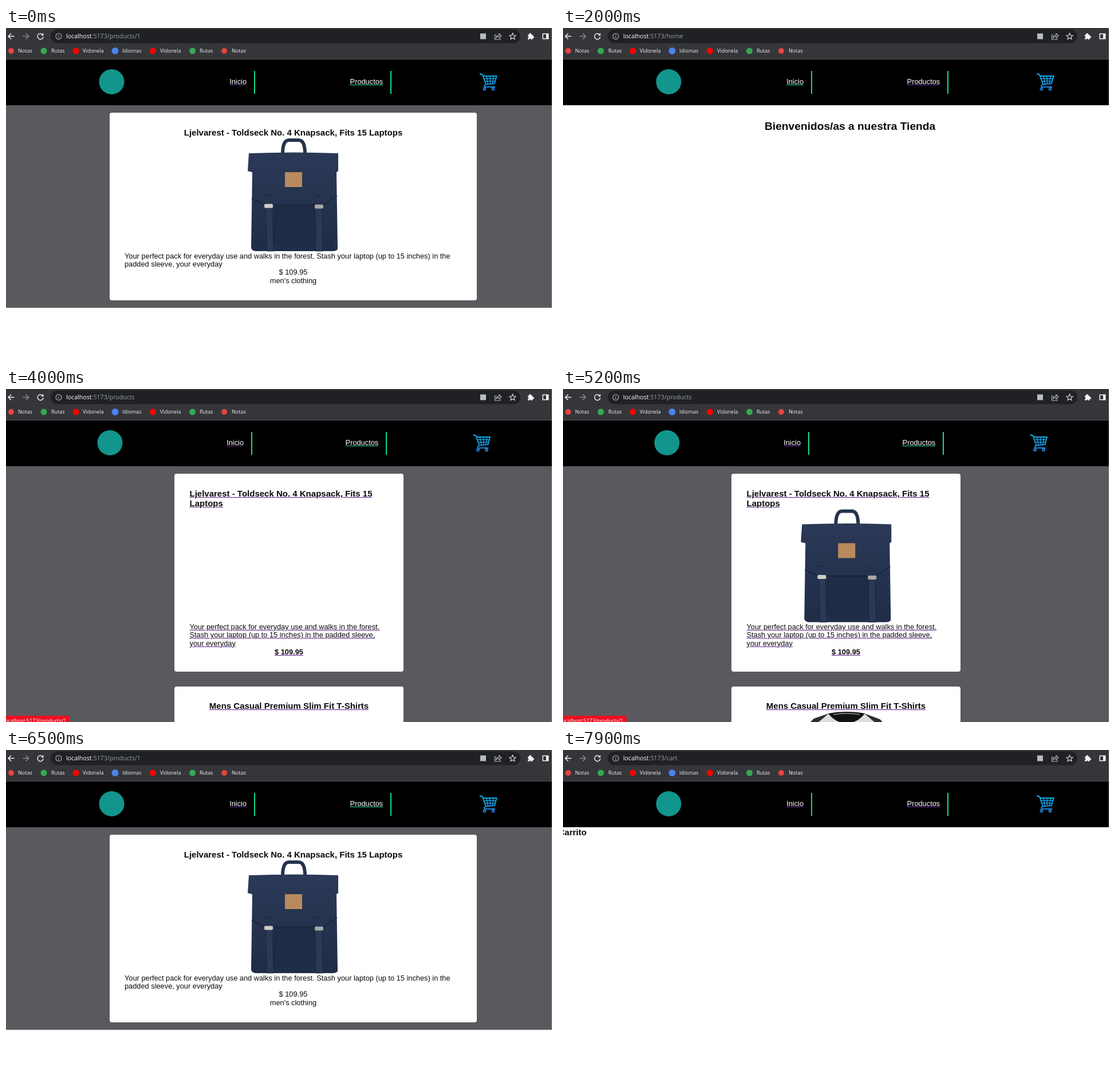
An HTML page that plays this animation: 962 by 582 pixels, repeating every 8 s.

```html
<!DOCTYPE html>
<html lang="es">
<head>
<meta charset="utf-8">
<title>Tienda</title>
<style>
  html, body { margin: 0; width: 100%; height: 100%; overflow: hidden; background: #fff; }
  #stage { position: absolute; left: 0; top: 0; width: 962px; height: 582px; overflow: hidden; background: #fff;
    font: 12.8px/14.4px "Liberation Sans", Arial, sans-serif; color: #0b0b0b; }
  #stage div, #stage p, svg { position: absolute; margin: 0; white-space: nowrap; }
  svg { left: 0; top: 0; overflow: hidden; }

  .ui { font-family: "Open Sans", "Noto Sans", sans-serif; }
  #url { left: 105px; top: 2px; font-size: 10.65px; line-height: 24px; color: #9aa0a6; }
  #url b { font-weight: 400; color: #fff; }
  .mark { top: 32px; font-size: 9px; line-height: 16px; color: #f1f2f3; }

  .nav { top: 87px; color: #fff; text-decoration: underline #6a2ca8; }
  .nav.active { text-decoration-color: #0fe596; }
  .nav.hover { text-decoration-color: #f01020; }
  .bar { top: 75px; width: 2px; height: 40px; background: #12dd8b; }
  .list .logo { transform: translateX(-3px); }
  .list .near { transform: translateX(-5px); }
  .list .mid { transform: translateX(-8px); }
  .list .far { transform: translateX(-11.5px); }

  .page { display: none; left: 0; top: 0; width: 962px; height: 582px; }
  .home .page.home, .loading .page.loading, .list .page.list,
  .detail .page.detail, .cart .page.cart { display: block; }
  .grey { left: 0; top: 135px; width: 953px; background: #5b595e; }
  .card { background: #fff; border-radius: 4px; }
  h1, h2 { position: absolute; margin: 0; white-space: nowrap; }
  h1 { font-size: 19.2px; line-height: 22px; }
  h2 { font-size: 15px; line-height: 17.3px; }
  .center { left: 0; right: 0; text-align: center; }
  .link { text-decoration: underline #551a8b; }
  .bare .photo { display: none; }

  #status { left: 0; top: 571px; height: 17px; box-sizing: border-box; text-indent: -4.3px; padding-right: 6px;
    font-size: 9px; line-height: 17px; color: #fff; background: #eb1020; border-top-right-radius: 3px; }
</style>
</head>
<body>
<div id="stage">
  <svg width="962" height="582" fill="none">
    <defs>
      <linearGradient id="cloth" x1="0" y1="0" x2="0" y2="1">
        <stop stop-color="#2b3957"/><stop offset="1" stop-color="#202d47"/>
      </linearGradient>
      <linearGradient id="blue" gradientUnits="userSpaceOnUse" x1="0" y1="79" x2="0" y2="109">
        <stop stop-color="#08b4e6"/><stop offset="1" stop-color="#2478d4"/>
      </linearGradient>
      <g id="backpack">
        <path d="M483 220 Q483 196 494 196 H511 Q522 196 522 220" fill="none" stroke="#25324c" stroke-width="6"/>
        <path d="M424 219 Q502 216 580 219 L580 250 L577 252 L579 386 Q578 390 570 390 H438 Q429 390 428 384 L430 252 L422 250 Z" fill="url(#cloth)"/>
        <path d="M429 298 L452 309 H554 L578 293" fill="none" stroke="#18233a" stroke-width="1.5"/>
        <path d="M470 310 H538 L540 366 Q540 378 528 378 H480 Q467 378 467 366 Z" fill="#1f2c46" stroke="#19243b"/>
        <path d="M429 370 L454 378 M578 368 L552 378" stroke="#18233a"/>
        <path d="M453 313 H465 L467 390 H456 Z M540 313 H552 L553 390 H541 Z" fill="#2c3956" stroke="#19243b" stroke-width=".8"/>
        <rect x="451" y="307.500" width="15" height="7" rx="2" fill="#d0ceca"/>
        <rect x="539" y="308.500" width="15" height="7" rx="2" fill="#aaa9a8"/>
        <path d="M454 292 H463 M541 293 H550" stroke="#151f33"/>
        <rect x="487" y="252" width="30" height="26" fill="#b98a5c"/>
      </g>
    </defs>

    <rect width="953" height="55" fill="#35363a"/>
    <rect x="78" y="2.500" width="820" height="24" rx="12" fill="#202124"/>
    <path d="M0 54.500 H953" stroke="#505155"/>
    <rect y="55" width="953" height="80" fill="#000"/>

    <g stroke="#f1f2f3" stroke-width="1.5">
      <path d="M14.500 14.500 H4 M9 9.500 L4 14.500 L9 19.500"/>
      <path d="M29 14.500 H39.500 M34.500 9.500 L39.500 14.500 L34.500 19.500" stroke="#87898d"/>
      <path d="M64.200 11.800 A5 5 0 1 0 65 15.500"/>
      <path d="M65.500 8.800 V13.200 H61 Z" fill="#f1f2f3" stroke="none"/>
    </g>
    <g stroke="#b9bcc0" stroke-width="1.100">
      <circle cx="92" cy="14.500" r="5"/>
      <path d="M92 13.700 V17.300 M92 11.500 V12.600"/>
      <rect x="828" y="9.500" width="10" height="10" fill="#b9bcc0" stroke="none"/>
      <path d="M856 12 H853.500 V20 H863 V17.500 M855.500 17 Q856 12.500 861 12.500 V9.800 L865 13.500 L861 17 V14.800 Q858 14.500 855.500 17 Z"/>
      <path d="M884.500 9 L886.100 12.800 L890 13.100 L887 15.700 L888 19.600 L884.500 17.500 L881 19.600 L882 15.700 L879 13.100 L882.900 12.800 Z" stroke="#e4e5e7"/>
    </g>
    <g fill="#f4f4f5">
      <rect x="911" y="11.500" width="8.500" height="8.500" rx="1"/>
      <circle cx="915.200" cy="11" r="2"/><circle cx="920" cy="15.700" r="2"/>
      <circle cx="911" cy="15.800" r="1.500" fill="#35363a"/><circle cx="915.200" cy="20" r="1.500" fill="#35363a"/>
      <path d="M936.500 9.500 H947.500 V19.500 H936.500 Z M938 11 V18 H943 V11 Z" fill-rule="evenodd"/>
    </g>
    <g>
      <circle cx="9" cy="40" r="5" fill="#e8453a"/>
      <circle cx="66" cy="40" r="5.500" fill="#36a853"/>
      <circle cx="122" cy="40" r="5.500" fill="#f00"/>
      <circle cx="190.500" cy="40" r="6" fill="#4a83ec"/>
      <circle cx="256.500" cy="40" r="5.500" fill="#f00"/>
      <circle cx="325.500" cy="40" r="5.500" fill="#36a853"/>
      <circle cx="381" cy="40" r="5" fill="#e8453a"/>
    </g>

    <circle class="logo" cx="184.500" cy="94" r="22" fill="#12958c"/>
    <g class="far" stroke="url(#blue)" stroke-width="2">
      <path d="M827 80 L832 81.500 L838 99 Q833 101 836 103 H854"/>
      <path d="M833 84 H856.500 L853 97 L837.500 98.500"/>
      <path d="M834.500 88.500 H855 M836 93 H854 M839 84 L841.500 98 M845 84 L845.500 98 M851 84 L849.500 97" stroke-width="1.500"/>
      <circle cx="835.500" cy="106.500" r="2"/><circle cx="850.500" cy="106.500" r="2"/>
    </g>
  </svg>

  <div id="url" class="ui"><b>localhost</b>:5173<span id="path"></span></div>
  <div class="ui mark" style="left:21px">Notas</div>
  <div class="ui mark" style="left:79px">Rutas</div>
  <div class="ui mark" style="left:134px">Vidonela</div>
  <div class="ui mark" style="left:203px">Idiomas</div>
  <div class="ui mark" style="left:269px">Vidonela</div>
  <div class="ui mark" style="left:338px">Rutas</div>
  <div class="ui mark" style="left:394px">Notas</div>

  <div id="inicio" class="nav near" style="left:390.2px">Inicio</div>
  <div class="bar near" style="left:433px"></div>
  <div id="productos" class="nav mid" style="left:600.6px">Productos</div>
  <div class="bar mid" style="left:671px"></div>

  <div class="page home"><h1 style="left:352px;top:161px">Bienvenidos/as a nuestra Tienda</h1></div>
  <div class="page loading"><h1 style="left:-8px;top:135px">Cargando...</h1></div>
  <div class="page cart"><h2 style="left:-8px;top:135px">Carrito</h2></div>

  <div class="page detail">
    <div class="grey" style="height:354px"></div>
    <div class="card" style="left:181px;top:148px;width:641px;height:328px">
      <h2 class="center" style="top:26px">Ljelvarest - Toldseck No. 4 Knapsack, Fits 15 Laptops</h2>
      <p style="left:26px;top:243.5px">Your perfect pack for everyday use and walks in the forest. Stash your laptop (up to 15 inches) in the<br>padded sleeve, your everyday</p>
      <p class="center" style="top:272.3px">$ 109.95<br>men's clothing</p>
    </div>
    <svg width="962" height="582"><use href="#backpack"/></svg>
  </div>

  <div class="page list">
    <div class="grey" style="height:447px"></div>
    <div class="card" style="left:294px;top:148px;width:400px;height:346px">
      <h2 class="link" style="left:26.5px;top:26px">Ljelvarest - Toldseck No. 4 Knapsack, Fits 15<br>Laptops</h2>
      <p class="link" style="left:26.5px;top:261px">Your perfect pack for everyday use and walks in the forest.<br>Stash your laptop (up to 15 inches) in the padded sleeve,<br>your everyday</p>
      <p class="center link" style="top:304.5px"><b>$ 109.95</b></p>
    </div>
    <div class="card" style="left:294px;top:519.5px;width:400px;height:80px">
      <h2 class="center link" style="top:25.5px">Mens Casual Premium Slim Fit T-Shirts</h2>
    </div>
    <svg class="photo" width="962" height="582">
      <use href="#backpack" x="-6.700" y="17.500"/>
      <path d="M464 567 L526 567 L553 577 L560 584 H430 L438 576 Z" fill="#2e2e31"/>
      <path d="M464 567 L444 584 H546 L526 567 Z" fill="#dcdcde"/>
      <path d="M463 567 Q495 561 527 567 Q514 584 495 584 Q476 584 463 567 Z" fill="#111113"/>
      <path d="M472 569 Q495 565 518 569" fill="none" stroke="#77777a" stroke-width="2"/>
    </svg>
  </div>

  <div id="status" class="ui"></div>
</div>

<script>
  const LOOP = 8000;
  const WIDE = { wide: true };
  const HALF = { alpha: .5 };
  const at = (time, page, path, link, options = {}) => ({ time, page, path, link, ...options });

  // time, visible page, address path, hovered link shown in the status bubble
  const timeline = [
    at(0, 'detail', '/products/1'),
    at(500, 'detail', '/products/1', '/home'),
    at(1200, 'home', '/home', '/home', WIDE),
    at(1900, 'home', '/home', '/home', { ...WIDE, ...HALF }),
    at(2000, 'home', '/home'),
    at(3000, 'home', '/home', '/home', HALF),
    at(3100, 'home', '/home', '/home'),
    at(3600, 'home', '/home', '/home', HALF),
    at(3700, 'home', '/home'),
    at(3800, 'home', '/home', '/products', { hover: true }),
    at(3900, 'loading', '/products', '/products', WIDE),
    at(4000, 'list', '/products', '/products/1', { bare: true }),
    at(5200, 'list', '/products', '/products/1'),
    at(5600, 'loading', '/products/1', '/products/1'),
    at(5700, 'loading', '/products/1', '/products/1', WIDE),
    at(6000, 'loading', '/products/1', '/products/1', { ...WIDE, ...HALF }),
    at(6100, 'loading', '/products/1'),
    at(6500, 'detail', '/products/1'),
    at(7300, 'cart', '/cart', '/cart', WIDE),
    at(7500, 'cart', '/cart', '/products'),
    at(7800, 'cart', '/cart', '/products', HALF),
    at(7900, 'cart', '/cart')
  ];

  const $ = id => document.getElementById(id);
  const [stage, path, status, inicio, productos] = ['stage', 'path', 'status', 'inicio', 'productos'].map($);
  let shown;

  function show(state) {
    stage.className = state.page + (state.bare ? ' bare' : '');
    path.textContent = state.path;
    inicio.classList.toggle('active', state.path === '/home');
    productos.classList.toggle('active', state.path.startsWith('/products'));
    productos.classList.toggle('hover', !!state.hover);
    status.textContent = state.link ? 'localhost:5173' + state.link : '';
    status.style.width = state.wide ? '329px' : 'auto';
    status.style.opacity = state.link ? state.alpha ?? 1 : 0;
  }

  const start = performance.now();
  function tick() {
    const time = (performance.now() - start) % LOOP;
    const state = timeline.findLast(s => s.time <= time);
    if (state !== shown) show(shown = state);
    requestAnimationFrame(tick);
  }
  tick();
</script>
</body>
</html>
```
